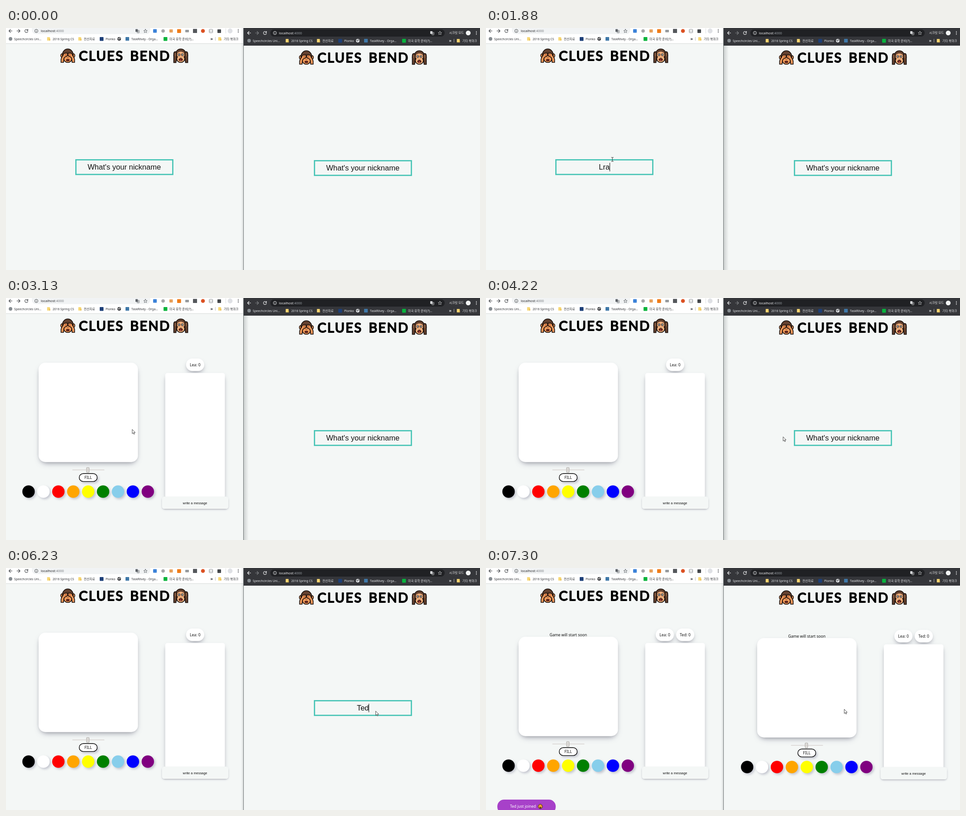
Recreate the animation shown at these times as an HTML page. Size 1047 by 535 pixels, loop 8000 ms.

```html
<!DOCTYPE html>
<html lang="en">
<head>
<meta charset="utf-8">
<title>Drawing game</title>
<style>
html, body { margin: 0; width: 100%; height: 100%; overflow: hidden; background: #f4f7f6; }
svg { display: block; }
text { font-family: "Noto Sans", "Noto Sans CJK KR", sans-serif; white-space: pre; }
.ui { font-size: 6.7px; }
.title { font: 400 29px Lato, sans-serif; letter-spacing: 2.4px; word-spacing: 4px; text-anchor: middle; stroke: #000; stroke-width: 1.9px; stroke-linejoin: round; }
.field { font: 16.5px "Liberation Sans", Arial, sans-serif; text-anchor: middle; }
.mid { text-anchor: middle; font-size: 8.6px; }
.msg { font: 7.4px "Liberation Sans", Arial, sans-serif; text-anchor: middle; }
.chip { filter: drop-shadow(3px 3px 2.5px rgba(50, 50, 93, .25)); }
.line { fill: none; stroke-linecap: round; stroke-linejoin: round; }
</style>
</head>
<body>
<svg id="stage" width="1047" height="535" viewBox="0 0 1047 535"></svg>
<script>
const LOOP = 8000;
const stage = document.getElementById('stage');

const rect = (x, y, w, h, r, fill, more = '') =>
  `<rect x="${x}" y="${y}" width="${w}" height="${h}" rx="${r}" fill="${fill}" ${more}/>`;
const disc = (x, y, r, fill, more = '') => `<circle cx="${x}" cy="${y}" r="${r}" fill="${fill}" ${more}/>`;
const text = (x, y, s, cls, fill = '#111', more = '') =>
  `<text x="${x}" y="${y}" class="${cls}" fill="${fill}" ${more}>${s}</text>`;
const line = (d, color, w = 1) => `<path class="line" d="${d}" stroke="${color}" stroke-width="${w}"/>`;
const group = (x, y, body, id = '') => `<g ${id && `id="${id}"`} transform="translate(${x} ${y})">${body}</g>`;

// Rounded box over two soft shadows, k sets how far they reach
function card(x, y, w, h, r, fill, k = 1) {
  const shadow = (dy, blur, inset, color) => rect(x + inset * k, y + (dy + inset) * k, w - 2 * inset * k, h - 2 * inset * k,
    r, color, `style="filter:blur(${blur * k}px)"`);
  return shadow(6.5, 6.5, 2.5, 'rgba(50,50,93,.25)') + shadow(4, 4, 3.5, 'rgba(0,0,0,.28)') + rect(x, y, w, h, r, fill);
}

// Browser chrome

const arrow = (x, y, c, dir) =>
  line(`M${x - 3.5 * dir} ${y}h${7 * dir}M${x} ${y - 3.5}l${3.5 * dir} 3.5l${-3.5 * dir} 3.5`, c, 1.1);
const reload = (x, y, c) =>
  line(`M${x + 3} ${y - 1.5}A3.4 3.4 0 1 0 ${x + 3.3} ${y + 1}M${x + 3.4} ${y - 3.6}v2.6h-2.6`, c, 1.1);
const info = (x, y, c) =>
  disc(x, y, 3.6, 'none', `stroke="${c}" stroke-width=".9"`) + line(`M${x} ${y}v1.7M${x} ${y - 1.8}v.1`, c, .9);
const translate = (x, y, c) =>
  rect(x - 4, y - 4, 5, 6, .6, c) + rect(x - .5, y - 1.5, 4.8, 5.8, .6, 'none', `stroke="${c}" stroke-width=".8"`) +
  line(`M${x + 1} ${y + .5}h2.2M${x + 2} ${y}l-.8 2.6M${x + 1.4} ${y + 1}l1.5 1.8`, c, .6);
const star = (x, y, c) =>
  line(`M${x} ${y - 3.8}l1.1 2.6 2.8.3-2.1 1.8.7 2.8-2.5-1.5-2.5 1.5.7-2.8-2.1-1.8 2.8-.3z`, c, .8);
const dots = (x, y, c) => [-3, 0, 3].map(d => disc(x, y + d, .9, c)).join('');
const folder = (x, y) => rect(x - 3.2, y - 3.8, 6.4, 7.6, .6, '#f7d774') + rect(x + 1.8, y - .5, 1.8, 4.3, .4, '#e5b84c');
const globe = (x, y, c, bg) =>
  disc(x, y, 3.9, c) + line(`M${x - 2.6} ${y - 1}l2 .8.4 2M${x + .5} ${y - 2.8}l.4 1.6 1.8.4`, bg, 1.1);

function bookmarks(y, c, bg, end) {
  const label = (x, s) => text(x, y + 2.5, s, 'ui', c);
  return disc(10, y, 3.9, '#858b90') + label(18, 'Speechcircles Uni...') +
    folder(94, y) + label(103, '2016 Spring CS') +
    folder(163, y) + label(172, '전산자료') +
    rect(207, y - 4, 8.4, 8.4, 1, '#1d3f78') + label(220, 'Plonko') +
    globe(250, y, c, bg) +
    rect(264, y - 4, 8, 8, .6, '#3f78a8') + label(277, 'TaskRilvey - Orga...') +
    rect(348, y - 4, 8.4, 8.4, .8, '#06b33c') + label(361, '미국 유학 준비(7)...') +
    text(end - 10.5, y + 2.5, '»', 'ui', c, 'font-weight="700" style="font-size:9px"') +
    rect(end, y - 4, .8, 8, 0, '#b4b6b8') + folder(end + 10, y) + label(end + 19, '기타 북마크');
}

const address = (x, y, c, dim) =>
  text(x, y, `localhost<tspan fill="${dim}">:4000</tspan>`, '', c, 'font-size="7.5"');

function leftChrome() {
  const c = '#3f4246';
  return rect(0, 0, 525, 34.5, 0, '#fff') + rect(57, -6, 262, 19.5, 9, '#f1f3f4') +
    arrow(10, 6.5, c, -1) + arrow(27.5, 6.5, c, 1) + reload(45, 6.5, c) + info(67, 6.5, c) +
    address(77, 9.3, '#202124', '#75797e') + translate(290, 6.5, '#5f6368') + star(308, 6.5, '#4f5357') +
    rect(325, 2.5, 8, 8, 1, '#3c82d8') + disc(347, 6.5, 3.8, '#a7a9ab') + rect(361, 3, 7.5, 7, 1, '#e8a05c') +
    rect(378, 2.5, 8.6, 8.4, 1, '#f07d1a') + rect(396, 4, 8, 5.5, 1, '#96999c') + rect(413, 2, 9, 9, .5, '#55585c') +
    disc(435, 6.5, 4.3, '#dc5224') + rect(449, 3, 7.5, 7.5, .8, 'none', 'stroke="#84888c"') +
    line('M449 7h7', '#84888c', .8) + rect(467, 3, 8, 8, 1, '#45484c') +
    rect(485, 1, .8, 11, 0, '#d5d7d9') + disc(495, 6.5, 5.4, '#dfe1e5') + dots(513, 6.5, c) +
    bookmarks(24, '#303236', '#fff', 462) + rect(0, 34, 525, .9, 0, '#d3d6d6');
}

function rightChrome() {
  const c = '#f1f2f3';
  return rect(525, 0, 522, 39, 0, '#35363a') + rect(584, 3, 385, 16, 8, '#202124') +
    arrow(537, 11, c, -1) + arrow(554.5, 11, '#7f8286', 1) + reload(572, 11, c) + info(594, 11, c) +
    address(603, 13.8, '#f3f4f5', '#9aa0a6') + translate(941, 11, '#d0d2d4') + star(958.5, 11, '#d0d2d4') +
    text(979, 13.4, '시크릿 모드', 'ui', c) + disc(1021, 11, 5.3, '#f1f3f4') + dots(1039, 11, c) +
    group(527, 0, bookmarks(28, '#e8eaed', '#35363a', 462));
}

// Page contents

function monkey(x, y, hidden) {
  const ink = 'stroke="#140d0a" stroke-width="1.6"', dark = '#140d0a';
  const skin = hidden ? '#f0985a' : '#f3b07c', fur = '#63412f';
  const oval = (cx, cy, rx, ry, f, more = ink) => `<ellipse cx="${cx}" cy="${cy}" rx="${rx}" ry="${ry}" fill="${f}" ${more}/>`;
  const flip = s => s + `<g transform="translate(33 0) scale(-1 1)">${s}</g>`;
  const nose = line('M15.4 20.5h.1M17.5 20.5h.1', dark, 1.1);
  let art = flip(oval(4, 16, 3, 4.2, skin)) + oval(16.5, 14.5, 12, 13.2, fur) + oval(16.5, 23.2, 8.8, 8, skin);
  if (hidden) {
    art += flip(`<path d="M1.5 31V24Q3 19 6 15.5Q7 10.5 11 10.5H15.5Q17 14.5 14.5 17.5Q10 18 8 22L7 31Z" fill="${skin}" ${ink}/>` +
      line('M10 13h5.5M10 15.4h5', '#8e4826', .9)) + nose + oval(16.5, 26, 3.6, 2, '#74201c', 'stroke="#140d0a"');
  } else {
    art += oval(16.5, 14, 8.6, 6.8, skin, '') +
      flip(oval(12.8, 14, 2.3, 2.8, '#fff', 'stroke="#140d0a"') + disc(13, 14.2, 1.1, dark) +
      `<path d="M1 31.5V12Q1.3 7.5 4.2 7.2Q7.4 7.4 7.4 12V21L6 31.5Z" fill="${fur}" ${ink}/>` + line('M4.4 11v6', '#b27a53', 1.2)) +
      nose + oval(16.5, 25, 4, 2.7, '#74201c', 'stroke="#140d0a"') + oval(16.5, 26.3, 2, .9, '#e8675b', '');
  }
  return group(x, y, art);
}

const header = monkey(120, 45, true) + text(262.3, 72.3, 'CLUES BEND', 'title', '#000') + monkey(369.5, 45, false);

const login = (x, y, id) => group(x, y,
  rect(154.4, 291.4, 214, 32.4, 0, '#f4f7f6', 'stroke="#46c4b5" stroke-width="2.7"') +
  text(261.2, 313, '', 'field', '#111', `id="${id}Text"`) + rect(0, 298, 1, 19, 0, '#111', `id="${id}Caret"`), id);

const COLORS = ['#000', '#fff', 'red', 'orange', '#ff0', 'green', 'skyblue', 'blue', 'purple'];

function game(id, x, y, players, msgY) {
  const duo = players.length > 1, d = duo ? 9 : 0;
  const pills = players.map((name, i) => {
    const cx = duo ? 395 + 45 * i : 417.8;
    return card(cx - 20, 133.8, 40, 27.8, 13.9, '#fff') + text(cx, 151, name + ': 0', 'mid');
  }).join('');
  const tools = card(72, 143, 219.5, 219.7, 15, '#fff') +
    rect(146.5, 379.3, 71, 1.8, .9, '#dcd8d6') +
    rect(178, 375, 5.6, 10.6, .5, '#eeece9', 'stroke="#96928e" stroke-width=".9"') + line('M180.8 377.5v5.5', '#aaa6a2', .8) +
    rect(161.8, 388.2, 39.6, 17.4, 8.7, '#fff', 'stroke="#000" stroke-width="1.4" class="chip"') +
    text(181.5, 400, 'FILL', 'mid') +
    COLORS.map((c, i) => disc(49.8 + 32.93 * i, 428, 13.7, c, 'class="chip"')).join('');
  return group(x, y, (duo ? text(181.7, 151, 'Game will start soon', 'mid') : '') + group(0, d, tools) + pills +
    card(351.7, 165.7, 131.8, 277, 5, '#fff') +
    card(344.3, 439 + msgY, 147.2, 27.3, 5.5, '#f4f7f6', .3) +
    text(417.5, 455.6 + msgY, 'write a message', 'msg'), id);
}

const toast = rect(25, 0, 129, 31, 15, '#a741c9') +
  text(53, 18.4, 'Ted just joined', '', '#fff', 'font-size="8.4" font-weight="500"') +
  disc(120, 15.2, 4.8, '#ffc83d', 'stroke="#24180c" stroke-width="1"') +
  disc(118.1, 14, 1.3, '#d6402f') + disc(121.9, 14, 1.3, '#d6402f') +
  `<path d="M117.2 16.5h5.6q-.6 2.8-2.8 2.8t-2.8-2.8z" fill="#54211a"/>`;

const fade = (id, a, b) => `<linearGradient id="${id}"><stop offset="0" stop-color="#30383a" stop-opacity="${a}"/>` +
  `<stop offset="1" stop-color="#30383a" stop-opacity="${b}"/></linearGradient>`;

stage.innerHTML = `<defs>${fade('toRight', .2, 0)}${fade('toLeft', 0, .12)}</defs>` +
  rect(0, 0, 1047, 535, 0, '#f4f7f6') +
  group(0, 0, header + login(0, 0, 'loginA') + game('solo', 0, 0, ['Lea'], 0) + game('duoA', 0, 0, ['Lea', 'Ted'], 0), 'pageA') +
  `<g id="bar">${rect(516, 35, 8, 500, 0, '#f1f1f1')}${rect(516.8, 44, 6.6, 460, 0, '#c1c1c1', 'id="thumb"')}` +
  `<path d="M518 41.5l2-2.4 2 2.4z" fill="#777"/></g>` +
  group(0, 0, toast, 'toast') + leftChrome() +
  rect(525, 0, 522, 535, 0, '#f4f7f6') + group(527, 4, header) + login(527, 2, 'loginB') +
  game('duoB', 527, 3, ['Lea', 'Ted'], -1.7) + rightChrome() +
  rect(519, 0, 5.5, 535, 0, 'url(#toLeft)', 'id="shadeA"') + rect(525, 0, 11, 535, 0, 'url(#toRight)', 'id="shadeB"') +
  rect(524, 0, 1.1, 535, 0, '#6f7576') +
  `<g id="pointer"><path id="hand" d="M0 0V9.4L2.2 7.4 3.7 10.8 5.2 10.1 3.7 6.9H6.7Z" fill="#fff" stroke="#222" stroke-width=".8" stroke-linejoin="round"/>` +
  `<g id="beam">${line('M-2.2-4.4h1.6l.6.5.6-.5h1.6M0-4v8M-2.2 4.4h1.6l.6-.5.6.5h1.6', '#222', .9)}</g></g>`;

const el = Object.fromEntries([...stage.querySelectorAll('[id]')].map(n => [n.id, n]));
const show = (n, on) => { n.style.display = on ? '' : 'none'; };
const last = (table, t) => table.filter(row => t >= row[0]).pop();

// Timeline

const ASK = "What's your nickname";
const typedA = [[0, ASK], [1650, 'L'], [1800, 'Lr'], [1880, 'Lra'], [2190, 'Lr'], [2340, 'L'], [2420, 'Le'], [2570, 'Lea']];
const typedB = [[0, ASK], [5290, 'T'], [5690, 'Te'], [5920, 'Ted']];
const caretA = [[0, 0], [780, 1], [1330, 0], [1650, 1]];
const caretB = [[0, 0], [4370, 1], [4910, 0], [5290, 1]];
// first step, last step, number of steps, end point
const moves = [
  [0, 0, 1, 950, 536], [70, 630, 8, 279.5, 290.5], [1030, 1030, 1, 279.2, 290.5], [2970, 2970, 1, 278.8, 290.5],
  [3590, 3590, 1, 277.5, 289], [3760, 4520, 11, 819, 314.5], [4680, 4680, 1, 816.6, 316.3],
  [6840, 6840, 1, 815, 315.6], [6920, 7300, 6, 791.3, 312.2]
];
const toastKeys = [[0, 540, 0], [6840, 530, .4], [6920, 520, .8], [7000, 515.5, .92], [7070, 513.5, .97], [7150, 512.4, 1], [7230, 512, 1]];

function pointerAt(t) {
  const i = moves.filter(m => t >= m[0]).length - 1;
  const [t0, t1, n, x, y] = moves[i], [, , , px, py] = moves[Math.max(0, i - 1)];
  const k = n > 1 ? Math.floor((t - t0) / ((t1 - t0) / (n - 1)) + 1e-6) + 1 : 1;
  const p = Math.min(1, k / n), e = p * p * (3 - 2 * p);
  return [px + (x - px) * e, py + (y - py) * e];
}

function setField(id, typed, caret, t) {
  const s = last(typed, t)[1], node = el[id + 'Text'];
  if (node.textContent !== s) node.textContent = s;
  const half = s === ASK ? 0 : node.getComputedTextLength() / 2;
  el[id + 'Caret'].setAttribute('x', Math.round(261 + half));
  show(el[id + 'Caret'], last(caret, t)[1]);
}

function draw(t) {
  const startA = 3130, startB = 6300, scroll = t >= startB && t < 7000;
  show(el.loginA, t < startA);
  show(el.solo, t >= startA && t < startB);
  show(el.duoA, t >= startB);
  show(el.loginB, t < startB);
  show(el.duoB, t >= startB);
  if (t < startA) setField('loginA', typedA, caretA, t);
  if (t < startB) setField('loginB', typedB, caretB, t);

  el.pageA.setAttribute('transform', `translate(${scroll ? -4.5 : 0} 0)`);
  show(el.bar, scroll);
  el.thumb.setAttribute('height', t < 6840 ? 460 : 491);
  const [, ty, alpha] = last(toastKeys, t);
  el.toast.setAttribute('transform', `translate(0 ${ty})`);
  el.toast.setAttribute('opacity', alpha);

  const focusA = t >= 780 && t < 4370;
  show(el.shadeA, !focusA);
  show(el.shadeB, focusA);

  const [x, y] = pointerAt(t);
  const over = (bx, by) => x >= bx && x <= bx + 217 && y >= by && y <= by + 35;
  const beam = t < 2970 && over(153, 290) || t < 6230 && over(680, 292);
  el.pointer.setAttribute('transform', `translate(${x} ${y})`);
  show(el.pointer, t >= 70);
  show(el.beam, beam);
  show(el.hand, !beam);
}

const began = performance.now();
function tick() {
  draw((performance.now() - began) % LOOP);
  requestAnimationFrame(tick);
}
tick();
</script>
</body>
</html>
```
